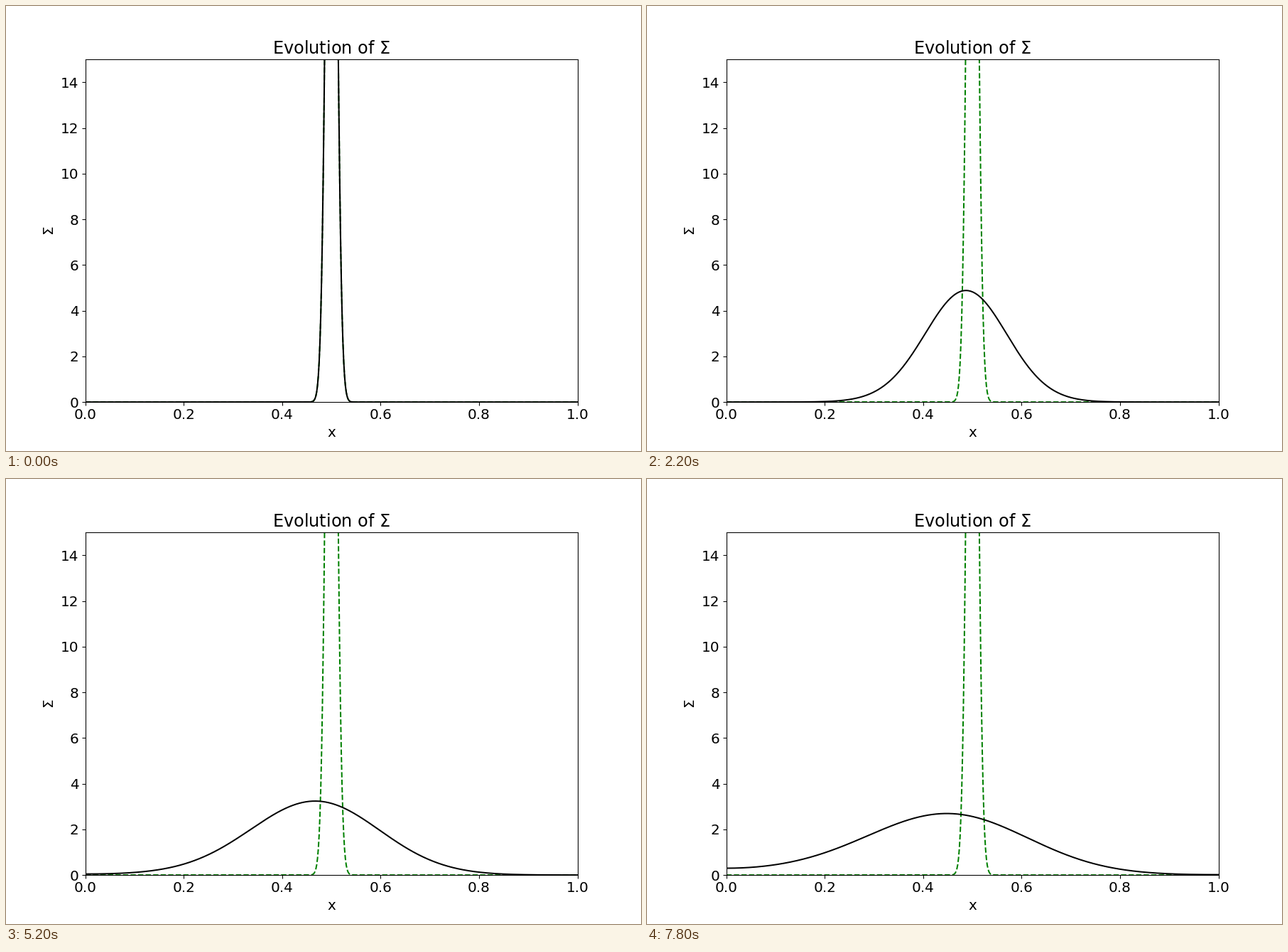
Animation, 894 px wide and 626 px high, one loop 8 s. Source, as a matplotlib script:

```python
import numpy as np
import matplotlib.pyplot as plt
from matplotlib.animation import FuncAnimation

W, H, DPI = 894, 626, 96
FRAMES, INTERVAL = 40, 200

CELLS, SUBSTEPS = 600, 4
X0, SIGMA0 = 0.5, 0.01    # starting ring
DIFF = 3.12e-4            # diffusion per frame
DRIFT = 1.93 * DIFF       # inward drift per frame, divided by x

plt.rcParams.update({"font.family": "DejaVu Sans", "font.size": 15})


def operator(x):
    """Matrix of DIFF * S'' + DRIFT / x * S' with flat slopes at both ends."""
    dx = x[1] - x[0]
    spread = DIFF / dx ** 2
    push = DRIFT / (2 * dx * x[1:-1])
    i = np.arange(1, len(x) - 1)
    a = np.zeros((len(x), len(x)))
    a[i, i - 1] = spread - push
    a[i, i] = -2 * spread
    a[i, i + 1] = spread + push
    a[0, :2] = -2 * spread, 2 * spread
    a[-1, -2:] = 2 * spread, -2 * spread
    return a


def solve(x):
    """Profiles for all frames, stepped implicitly from a narrow Gaussian."""
    step = np.linalg.inv(np.eye(len(x)) - operator(x) / SUBSTEPS)
    step = np.linalg.matrix_power(step, SUBSTEPS)
    ring = np.exp(-((x - X0) / SIGMA0) ** 2 / 2) / (SIGMA0 * np.sqrt(2 * np.pi))
    profiles = [ring]
    while len(profiles) < FRAMES:
        profiles.append(step @ profiles[-1])
    return profiles


x = np.linspace(0, 1, CELLS + 1)
profiles = solve(x)

fig, ax = plt.subplots(figsize=(W / DPI, H / DPI), dpi=DPI)
ax.set(xlim=(0, 1), ylim=(0, 15), xlabel="x", ylabel=r"$\Sigma$",
       title=r"Evolution of $\Sigma$")

ax.plot(x, profiles[0], "--", color="green", lw=1.5)
curve, = ax.plot(x, profiles[0], color="black", lw=1.5)


def update(frame):
    curve.set_ydata(profiles[frame])
    return curve,


anim = FuncAnimation(fig, update, frames=FRAMES, interval=INTERVAL,
                     repeat=True, repeat_delay=0)
plt.show()
```
